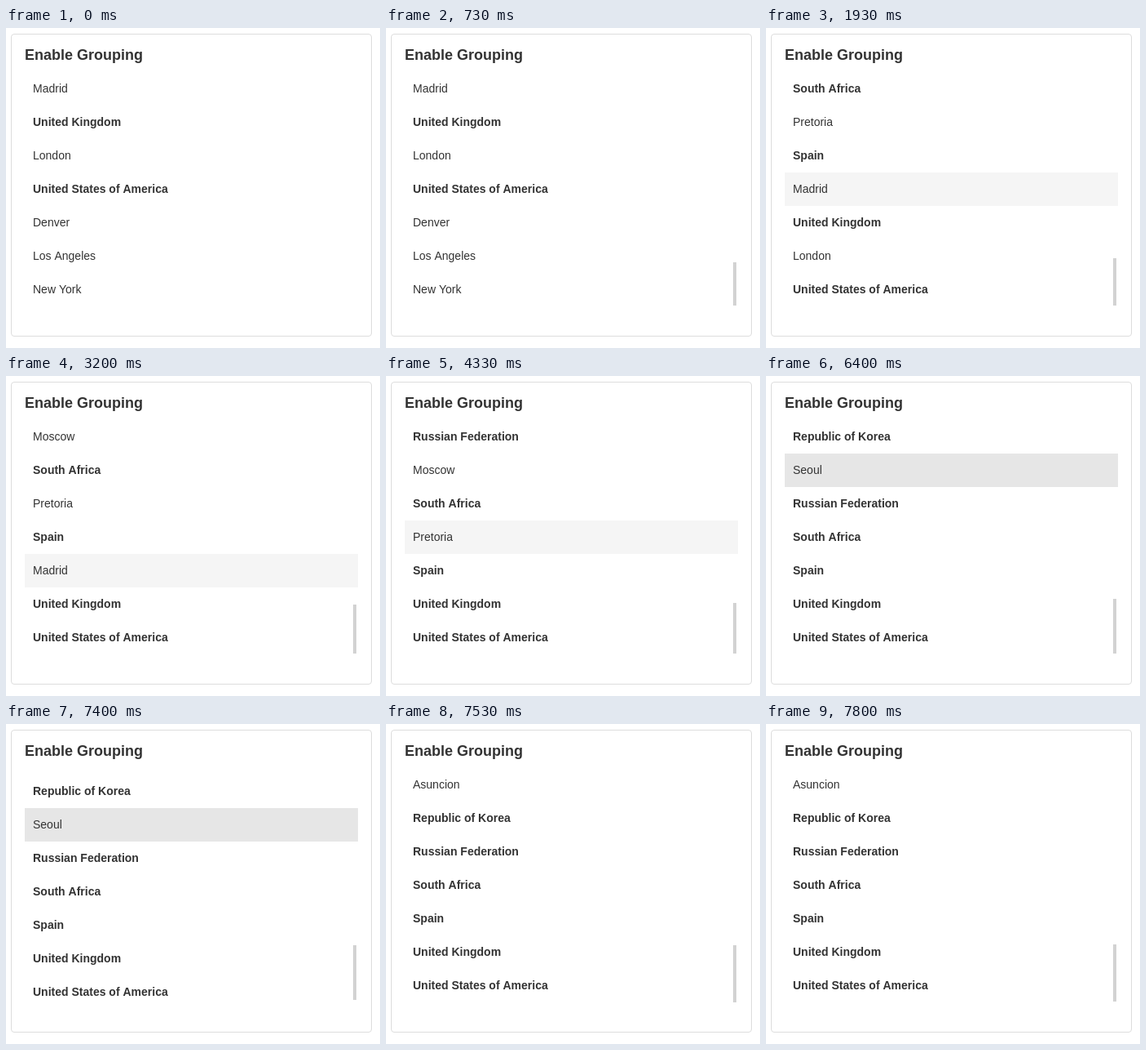
An HTML page with a canvas for the animation above (8.39 s loop, 459 by 392 pixels).

```html
<!DOCTYPE html>
<html lang="en">
<head>
<meta charset="utf-8">
<title>Enable Grouping</title>
<style>
  html, body { margin: 0; width: 100%; height: 100%; overflow: hidden; background: #fff; }
  canvas { display: block; width: 459px; height: 392px; }
</style>
</head>
<body>
<canvas id="stage"></canvas>
<script>
const W = 459, H = 392, LOOP = 8390;
const FONT = 'Arial, "Liberation Sans", sans-serif';
const VIEW = { x: 23, y: 62, w: 409, h: 279 };
const ROW = 41;
const HOVER = '#f5f5f5', ACTIVE = '#e6e6e6';

const groups = [
  ['Paraguay', 'Asuncion'],
  ['Republic of Korea', 'Seoul'],
  ['Russian Federation', 'Moscow'],
  ['South Africa', 'Pretoria'],
  ['Spain', 'Madrid'],
  ['United Kingdom', 'London'],
  ['United States of America', 'Denver', 'Los Angeles', 'New York']
];

// removed: cities deleted so far, counted from the end of the list
// bar: top, bottom and opacity of the scroll thumb
const states = [
  { at: 0, removed: 0 },
  { at: 670, removed: 0, bar: [287, 340, 0.5] },
  { at: 730, removed: 0, bar: [287, 340, 1] },
  { at: 1930, removed: 3, bar: [282, 340, 1], marks: { Madrid: HOVER } },
  { at: 3200, removed: 4, bar: [280, 340, 1], marks: { Madrid: HOVER } },
  { at: 4330, removed: 5, bar: [278, 340, 1], marks: { Pretoria: HOVER } },
  { at: 5400, removed: 6, bar: [275, 340, 1], marks: { Seoul: ACTIVE, Moscow: HOVER } },
  { at: 6400, removed: 7, bar: [273, 340, 1], marks: { Seoul: ACTIVE } },
  { at: 7400, removed: 7, bar: [271, 338, 1], marks: { Seoul: ACTIVE }, shift: 8 },
  { at: 7530, removed: 8, bar: [271, 341, 1] },
  { at: 7800, removed: 8, bar: [270, 340, 1] }
];

const canvas = document.getElementById('stage');
const ctx = canvas.getContext('2d');
const dpr = window.devicePixelRatio || 1;
canvas.width = W * dpr;
canvas.height = H * dpr;
ctx.scale(dpr, dpr);

// Remaining rows, from the bottom of the list upwards
function rowsFromEnd(removed) {
  const rows = [];
  for (const [name, ...cities] of [...groups].reverse()) {
    for (const city of cities.reverse()) {
      if (removed-- <= 0) rows.push({ text: city });
    }
    rows.push({ text: name, header: true });
  }
  return rows;
}

function label(text, x, baseline, size, bold) {
  ctx.font = `${bold ? 'bold ' : ''}${size}px ${FONT}`;
  ctx.fillStyle = '#333';
  ctx.fillText(text, x, baseline);
}

function drawCard() {
  ctx.fillStyle = '#fff';
  ctx.fillRect(0, 0, W, H);
  ctx.strokeStyle = '#ddd';
  ctx.lineWidth = 1;
  ctx.beginPath();
  ctx.roundRect(6.5, 7.5, 442, 370, 3.5);
  ctx.stroke();
  label('Enable Grouping', 23, 39, 18, true);
}

function drawList({ removed, marks = {}, shift = 0 }) {
  ctx.save();
  ctx.beginPath();
  ctx.rect(VIEW.x, VIEW.y, VIEW.w, VIEW.h);
  ctx.clip();
  rowsFromEnd(removed).forEach(({ text, header }, i) => {
    const y = VIEW.y + VIEW.h - (i + 1) * ROW + shift;
    if (y + ROW <= VIEW.y) return;
    if (marks[text]) {
      ctx.fillStyle = marks[text];
      ctx.fillRect(VIEW.x, y, VIEW.w, ROW);
    }
    label(text, 33, y + 25, 14, header);
  });
  ctx.restore();
}

function drawBar([top, bottom, alpha]) {
  ctx.globalAlpha = alpha;
  ctx.fillStyle = '#d2d2d2';
  ctx.fillRect(426, top, 4, bottom - top);
  ctx.globalAlpha = 1;
}

const start = performance.now();
function frame() {
  const t = (performance.now() - start) % LOOP;
  const state = states.findLast(s => s.at <= t);
  drawCard();
  drawList(state);
  if (state.bar) drawBar(state.bar);
  requestAnimationFrame(frame);
}
frame();
</script>
</body>
</html>
```
